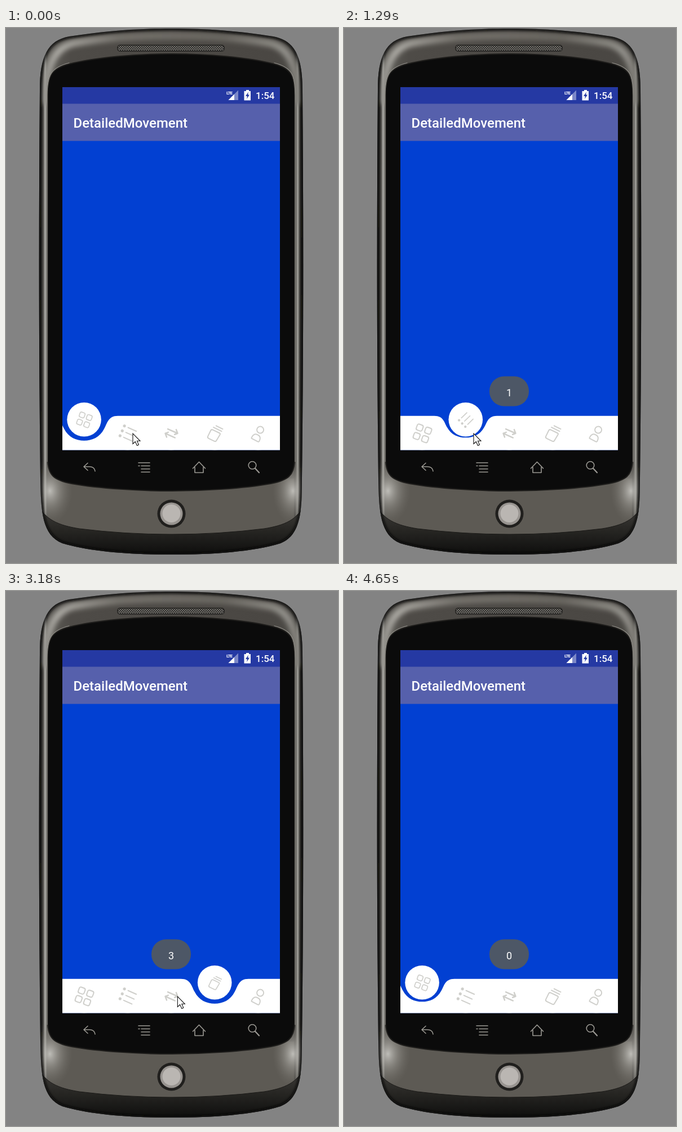
An HTML page for the animation above (4680 ms loop, 589 by 950 pixels).

```html
<!DOCTYPE html>
<html lang="en">
<head>
<meta charset="utf-8">
<title>Tab bar</title>
<style>
  html, body { margin: 0; width: 100%; height: 100%; overflow: hidden; background: #838383; }
  svg { display: block; width: 589px; height: 950px; }
  text { font-family: Roboto, sans-serif; fill: #fff; }
  .line { fill: none; stroke-linecap: round; stroke-linejoin: round; }
</style>
</head>
<body>
<svg viewBox="0 0 589 950">
  <defs>
    <linearGradient id="metal">
      <stop offset="0" stop-color="#080808"/>
      <stop offset=".007" stop-color="#2b2a28"/>
      <stop offset=".016" stop-color="#55534f"/>
      <stop offset=".023" stop-color="#b0afaa"/>
      <stop offset=".03" stop-color="#5e5c57"/>
      <stop offset=".12" stop-color="#4e4b47"/>
      <stop offset=".88" stop-color="#4a4743"/>
      <stop offset=".97" stop-color="#4d4b47"/>
      <stop offset=".979" stop-color="#a3a29c"/>
      <stop offset=".987" stop-color="#42413d"/>
      <stop offset="1" stop-color="#080808"/>
    </linearGradient>
    <linearGradient id="sheen" gradientUnits="userSpaceOnUse" x1="60" x2="528" y1="0" y2="0">
      <stop offset="0" stop-color="#8d8b86"/>
      <stop offset=".07" stop-color="#aaa8a2"/>
      <stop offset=".3" stop-color="#75726c"/>
      <stop offset=".7" stop-color="#6a6761"/>
      <stop offset=".93" stop-color="#93918b"/>
      <stop offset="1" stop-color="#77756f"/>
    </linearGradient>
    <linearGradient id="base" x2="0" y2="1">
      <stop offset="0" stop-color="#454340"/>
      <stop offset=".45" stop-color="#2a2926"/>
      <stop offset="1" stop-color="#0b0b0a"/>
    </linearGradient>
    <radialGradient id="glow">
      <stop offset="0" stop-color="#cfcec9" stop-opacity=".85"/>
      <stop offset=".45" stop-color="#a09e98" stop-opacity=".5"/>
      <stop offset="1" stop-color="#77746e" stop-opacity="0"/>
    </radialGradient>
    <pattern id="mesh" width="4" height="4" patternUnits="userSpaceOnUse">
      <path fill="#777570" d="M0 0h4v4h-4z"/>
      <path fill="#282725" d="M0 0h2v2h-2zM2 2h2v2h-2z"/>
    </pattern>
    <filter id="soft" x="-10%" y="-50%" width="120%" height="200%"><feGaussianBlur stdDeviation="4"/></filter>
    <filter id="edge" x="-5%" y="-5%" width="110%" height="110%"><feGaussianBlur stdDeviation="2"/></filter>
    <clipPath id="bodyClip"><use href="#body"/></clipPath>
    <clipPath id="screenClip"><path d="M100 105h386v644.5h-386z"/></clipPath>
    <path id="body" d="M60 110C60 50 74 22 112 15C180 5 230 1 294 1S410 5 474 15C512 22 526 50 526 110Q529 480 525 800C525 860 523 900 487 915C438 930 368 935 294 935S150 930 100 915C64 900 62 860 61 800Q57 480 60 110Z"/>
  </defs>

  <use href="#body" fill="url(#metal)"/>
  <g clip-path="url(#bodyClip)">
    <path class="line" stroke="url(#sheen)" stroke-width="13" filter="url(#soft)" d="M70 130C70 68 84 36 120 27C180 17 230 14 294 14S408 17 468 27C504 36 517 68 517 130"/>
    <path fill="#5d5a54" d="M76 800H511V905H76z"/>
    <ellipse cx="78" cy="822" rx="40" ry="58" fill="url(#glow)"/>
    <ellipse cx="509" cy="822" rx="36" ry="58" fill="url(#glow)"/>
    <path fill="url(#base)" stroke="#1b1a18" d="M55 842C68 874 94 883 130 889Q210 899 294 899T458 889C494 883 518 874 531 842V940H55Z"/>
    <use href="#body" fill="none" stroke="#090908" stroke-width="6" filter="url(#edge)"/>
  </g>
  <path fill="#0b0b0b" stroke="#1e1d1b" stroke-width="2" d="M74 120C74 85 80 72 112 64C160 52 230 46 294 46S430 52 476 64C506 72 512 85 512 120V765C512 795 500 803 470 809C420 818 350 822 294 822S166 818 116 809C86 803 74 795 74 765Z"/>
  <path class="line" stroke="#8f8d87" stroke-width="1.2" d="M73 770V120C73 84 80 70 112 62M513 770V120C513 84 508 70 476 62"/>
  <rect x="198" y="30.500" width="189" height="10.500" rx="4" fill="url(#mesh)" stroke="#22211f" stroke-width="1.500"/>
  <circle cx="293.500" cy="862.500" r="25" fill="#201f1d"/>
  <circle cx="293.500" cy="862.500" r="20" fill="#989490"/>
  <circle cx="293.500" cy="862" r="16" fill="#bab6b2"/>

  <g class="line" stroke="#9c9a94" stroke-width="1.6">
    <path d="M145 772.500L138 779L145 785.500M138 779H148Q157 779 158 787"/>
    <path d="M235 772H255M240 777.500H255M240 783H255M240 788.500H255M235 777.500H237"/>
    <path d="M331.500 782L342.500 770.500L353.500 782M335 780V789.500H350V780"/>
    <circle cx="437" cy="776.500" r="6.800"/><path d="M442 782L449 789.500" stroke-width="2.200"/>
  </g>

  <g clip-path="url(#screenClip)">
    <path fill="#0240d2" d="M100 105h386v645h-386z"/>
    <path fill="#5660ac" d="M100 134h386v66.500h-386z"/>
    <path fill="#2539a3" d="M100 105h386v29.500h-386z"/>
    <text x="391" y="117.500" font-size="8" font-weight="700" letter-spacing="-1">LTE</text>
    <path fill="#7c88c8" d="M412 110.500V128H394.500Z"/>
    <path fill="#fff" d="M405 117.500V128H394.500Z"/>
    <path fill="#fff" d="M426 110h5v2h3v16.500h-11.500v-16.500h3.500z"/>
    <path fill="#2539a3" d="M430 113.500L425 121H428L427 126L432 118.500H429Z"/>
    <text x="443" y="126" font-size="17" font-weight="500">1:54</text>
    <text x="119.500" y="177" font-size="24" font-weight="500">DetailedMovement</text>
    <path id="bar" fill="#fff"/>
    <g id="tabs"></g>
    <g id="toast">
      <rect x="258" y="618.500" width="70" height="53" rx="26" fill="#4d5766"/>
      <text id="note" x="293" y="653.500" font-size="18" text-anchor="middle"></text>
    </g>
  </g>
  <path id="cursor" fill="#fff" stroke="#111" stroke-width="1.100" d="M0 0V18.500L4.300 14.500L7.500 21.500L10.500 20L7.500 13.300H13Z"/>
</svg>

<script>
const LOOP = 4680, TOP = 688.7, STEP = 77.2, OPEN = 600, CLOSE = 200, SPIN_END = .72;
const $ = id => document.getElementById(id);
const clamp = v => Math.max(0, Math.min(1, v));
const mix = (a, b, k) => a + (b - a) * k;
const centre = i => 138.6 + STEP * i;

const square = (x, y) => `<rect x="${x - 5.5}" y="${y - 5.5}" width="11" height="11" rx="3"/>`;
const row = y => `<circle cx="-11" cy="${y}" r="1.6" fill="#cfcfcb"/><path d="M-4 ${y}H12"/>`;
const icons = [
  [20, square(-8, -8) + square(8, -8) + square(-8, 8) + square(8, 8)],
  [24, row(-9.5) + row(0) + row(9.5)],
  [24, '<path stroke-width="2.5" d="M-9-4.500H10L5-9.500M10-4.500L6-.5M9 4.500H-10L-5 9.500M-10 4.500L-6 .5"/>'],
  [26, '<path d="M-6-4H7Q9-4 9-2L8 10Q8 13 5 13H-6Q-9 13-9 10V-1Q-9-4-6-4ZM-7-8.500H9M-4-13H9"/>'],
  [27, '<circle cy="-7" r="6"/><path d="M-7.500 12Q-8 3 0 3T7.500 12Q7.500 13.500 6 13.500H-6Q-7.500 13.500-7.500 12Z"/>']
];

$('tabs').innerHTML = icons.map(([, art]) =>
  `<g><circle r="30.3" fill="#fff"/><g class="line" stroke="#cfcfcb" stroke-width="2">${art}</g></g>`).join('');
const tabs = [...$('tabs').children];

// Selected tab with its opening and closing start times
const visits = [
  { tab: 0, open: -1000, close: 700 },
  { tab: 1, open: 900, close: 1917 },
  { tab: 3, open: 2117, close: 4017 },
  { tab: 0, open: 4217, close: 9000 }
];
const toasts = [[1150, 2740, '1'], [2830, 4390, '3'], [4460, 9000, '0']];
const moves = [
  [0, 225, 720], [300, 230, 720], [1400, 230, 720], [1830, 372, 718],
  [2950, 372, 718], [3600, 138, 725], [4350, 138, 725]
];

function dip(x, p) {
  const w = mix(.4, 1, p);
  const pt = (a, b) => `${x + a * w} ${TOP + b * p}`;
  return `L${pt(-60, 0)}C${pt(-42, 0)} ${pt(-41, 14)} ${pt(-35.5, 23)}` +
    `C${pt(-28, 38)} ${pt(-14, 44)} ${pt(0, 44)}` +
    `C${pt(14, 44)} ${pt(28, 38)} ${pt(35.5, 23)}` +
    `C${pt(41, 14)} ${pt(42, 0)} ${pt(60, 0)}`;
}

function drawTabs(t) {
  const now = visits.find(v => t < v.close + CLOSE);
  const u = clamp((t - now.open) / OPEN);
  const shut = clamp((t - now.close) / CLOSE);
  const p = Math.min(1 - (1 - u) ** 2, 1 - shut * shut);
  const rise = clamp(p / .87);
  const spin = -720 * (1 - clamp(u / SPIN_END));
  const from = now.tab === 0 ? 0 : 100;
  $('bar').setAttribute('d', `M${from} ${TOP}${dip(centre(now.tab), p)}L486 ${TOP}V750H${from}Z`);
  tabs.forEach((g, i) => {
    const up = i === now.tab ? rise : 0;
    const turn = icons[i][0] + (up ? spin : 0);
    g.setAttribute('transform', `translate(${centre(i)} ${mix(719.3, 695.3, up)})`);
    g.lastChild.setAttribute('transform', `translate(.5 .5) rotate(${turn}) scale(${mix(1, .84, up)})`);
  });
}

function drawToast(t) {
  const hit = toasts.find(([a, b]) => t >= a && t < b);
  $('toast').setAttribute('opacity', hit ? clamp(Math.min((t - hit[0]) / 110, (hit[1] - t) / 110)) : 0);
  if (hit) $('note').textContent = hit[2];
}

function drawCursor(t) {
  const i = moves.findIndex(m => m[0] > t);
  $('cursor').setAttribute('visibility', i < 0 ? 'hidden' : 'visible');
  if (i < 0) return;
  const [a, b] = [moves[i - 1], moves[i]];
  const k = (t - a[0]) / (b[0] - a[0]), e = k * k * (3 - 2 * k);
  $('cursor').setAttribute('transform', `translate(${mix(a[1], b[1], e)} ${mix(a[2], b[2], e)})`);
}

const start = performance.now();
function frame() {
  const t = (performance.now() - start) % LOOP;
  drawTabs(t);
  drawToast(t);
  drawCursor(t);
  requestAnimationFrame(frame);
}
frame();
</script>
</body>
</html>
```
